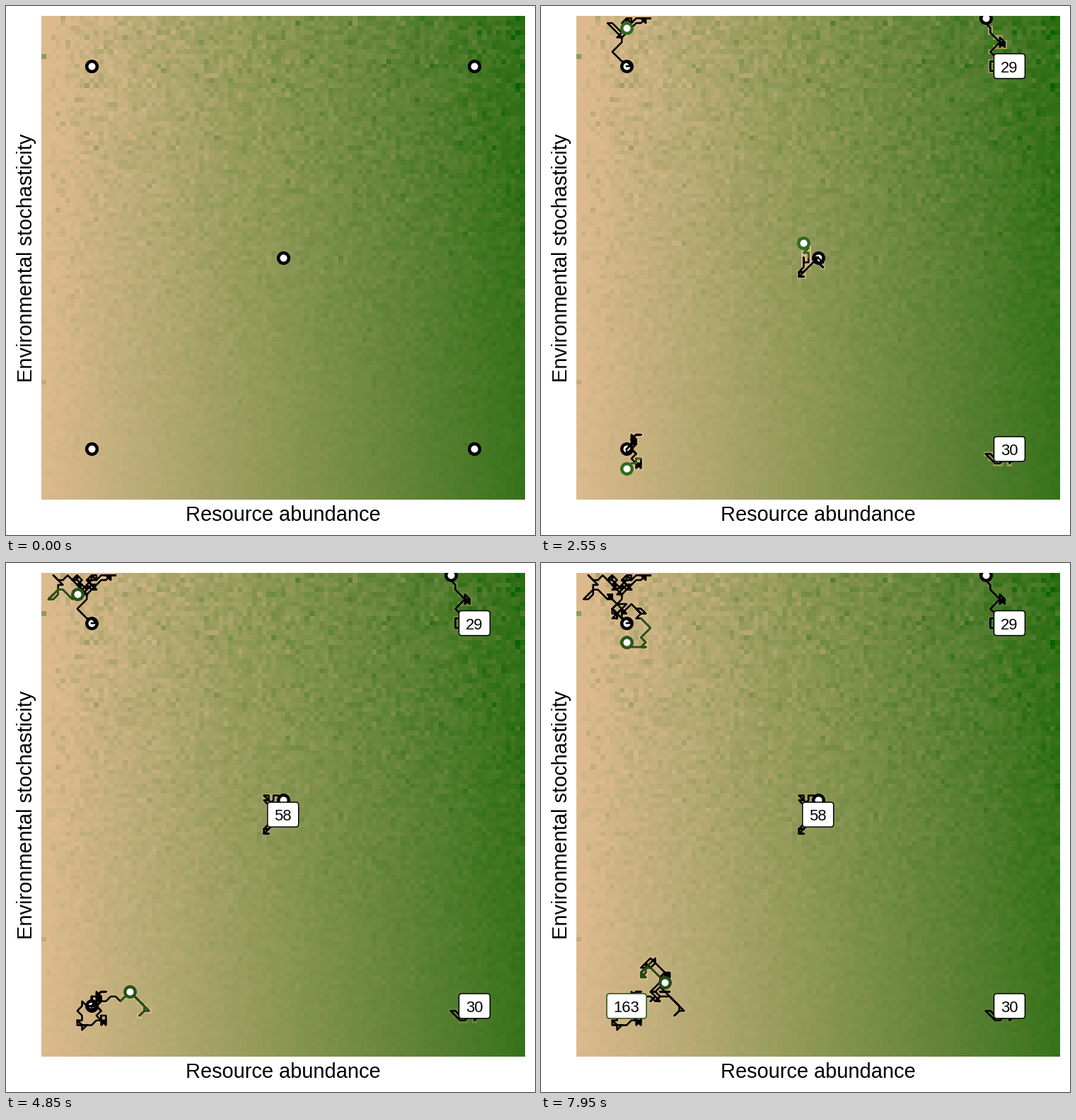
Animation, 748 px wide and 748 px high, one loop 8 s. Source, as a matplotlib script:

```python
import numpy as np
import matplotlib.pyplot as plt
from itertools import product
from matplotlib.animation import FuncAnimation
from matplotlib.colors import ListedColormap
from matplotlib.patches import FancyBboxPatch

SIZE, DPI = 748, 88
PT = 72 / DPI                 # one pixel in points
LEFT, TOP, SIDE = 50, 14, 683.5
N = 101
PX = N / SIDE                 # one pixel in cells
FRAMES, HOLD = 160, 5
FONT = "Liberation Sans"
GREEN = np.array([0.25, 0.54, 0.16])
MOVES = np.array(list(product((-1, 0, 1), repeat=2)))


def lab_ramp(a, b, n=256):
    """Colour ramp between two CIELAB colours, as sRGB rows."""
    t = np.linspace(0, 1, n)[:, None]
    L, A, B = (np.array(a) * (1 - t) + np.array(b) * t).T
    fy = (L + 16) / 116
    f = np.array([fy + A / 500, fy, fy - B / 200])
    xyz = np.where(f > 6 / 29, f ** 3, (f - 4 / 29) * 0.12842)
    xyz *= np.array([[0.9505], [1], [1.089]])
    m = np.array([[3.2406, -1.5372, -0.4986],
                  [-0.9689, 1.8758, 0.0415],
                  [0.0557, -0.2040, 1.0570]])
    lin = np.clip(m @ xyz, 0, 1)
    rgb = np.where(lin > 0.0031308, 1.055 * lin ** (1 / 2.4) - 0.055, 12.92 * lin)
    return rgb.T


def landscape():
    """Resource mean grows to the right, its spread grows upwards."""
    rng = np.random.default_rng(11)
    x = (np.arange(N)[None, :] + 0.5) / N
    y = 1 - np.arange(N)[:, None] / N
    mean = (0.84 + 0.04 * y) * x
    sd = 0.006 + 0.05 * y + 0 * x
    return np.clip(rng.gamma((mean / sd) ** 2, sd ** 2 / mean), 0, 1)


def wander(a, b, steps, rng):
    """Random one-cell moves from a that arrive at b after the given steps."""
    a, b = np.array(a), np.array(b)
    low = np.maximum(np.minimum(a, b) - 1, 0)
    high = np.minimum(np.maximum(a, b) + 1, N - 1)
    for left in reversed(range(steps)):
        near = a + MOVES
        ok = ((near >= low) & (near <= high) & (abs(near - b) <= left)).all(axis=1)
        a = rng.choice(near[ok])
        yield a


class Walker:
    """Random walk through a few (frame, column, row) points."""

    def __init__(self, x, y, *stops, seed, life=None):
        rng = np.random.default_rng(seed)
        path = [(x, y)] * (HOLD + 1)
        for frame, *goal in stops:
            path += list(wander(path[-1], goal, frame - len(path) + 1, rng))
        self.end, self.life = len(path) - 1, life
        path += [path[-1]] * (FRAMES - len(path))
        self.path = np.array(path)

    def dead(self, n):
        return self.life is not None and n >= self.end

    def tint(self, n):
        """Black at first, then a slowly pulsing green; fades after death."""
        m = min(n, self.end)
        pulse = 0.8 - 0.2 * np.cos(2 * np.pi * (m - 38) / 58)
        fade = 1 - (n - self.end) / 8 if self.dead(n) else 1
        return GREEN * pulse * np.clip((m - 24) / 12, 0, 1) * max(0, fade)

    def graze(self, food, n):
        for t, (x, y) in enumerate(self.path[:min(n, self.end) + 1]):
            if t > HOLD:
                food[y, x] = LAND[y, x] * (1 - np.exp(-(n - t) / 45))


WALKERS = [
    Walker(10, 10, (15, 7, 2), (19, 9, 3), (27, 14, 0), (38, 10, 0), (65, 8, 2),
           (80, 2, 0), (97, 7, 4), (108, 7, 9), (120, 9, 6), (135, 13, 7),
           (150, 14, 14), (159, 10, 14), seed=3),
    Walker(10, 90, (19, 12, 88), (38, 12, 93), (52, 9, 94), (65, 8, 89),
           (90, 22, 91), (97, 18, 87), (107, 16, 88), (120, 18, 83),
           (133, 15, 80), (147, 13, 83), (158, 18, 85), seed=5, life=163),
    Walker(50, 50, (19, 50, 51), (27, 47, 53), (38, 47, 50), (52, 47, 46),
           (60, 50, 47), seed=7, life=58),
    Walker(90, 10, (9, 88, 12), (13, 86, 9), (19, 88, 5), (32, 85, 0),
           seed=2, life=29),
    Walker(90, 90, (13, 86, 92), (19, 90, 92), (33, 89, 90), seed=4, life=30),
]
LAND = landscape()

fig = plt.figure(figsize=(SIZE / DPI, SIZE / DPI), dpi=DPI, facecolor="white")
ax = fig.add_axes([LEFT / SIZE, 1 - (TOP + SIDE) / SIZE, SIDE / SIZE, SIDE / SIZE])
cmap = ListedColormap(lab_ramp((77.5, 6, 27), (36.2, -43.37, 41.86)))
image = ax.imshow(LAND, cmap=cmap, vmin=0, vmax=1, interpolation="nearest",
                  aspect="auto")
ax.set(xlim=(-0.5, N - 0.5), ylim=(N - 0.5, -0.5))
ax.axis("off")

mid_x, mid_y = (LEFT + SIDE / 2) / SIZE, 1 - (TOP + SIDE / 2) / SIZE
caption = dict(family=FONT, size=29 * PT, ha="center", va="baseline",
               rotation_mode="anchor")
fig.text(mid_x, 1 - 728 / SIZE, "Resource abundance", **caption)
fig.text(37 / SIZE, mid_y, "Environmental stochasticity", rotation=90, **caption)


def ring(x, y, z):
    return ax.plot([x], [y], "o", ms=14.5 * PT, mfc="white", mec="black",
                   mew=4.4 * PT, zorder=z)[0]


def trail(z):
    return ax.plot([], [], color="black", lw=2.6 * PT, zorder=z,
                   solid_joinstyle="round")[0]


def tag(x, y, value):
    w, h = (19.5 + 12.2 * len(str(value))) * PX, 35 * PX
    box = FancyBboxPatch((x - w / 2, y - h / 2), w, h, fc="white", lw=1.5 * PT,
                         boxstyle=f"round,pad=0,rounding_size={4 * PX}", zorder=6)
    ax.add_patch(box)
    text = ax.text(x, y + 8.5 * PX, str(value), family=FONT, size=22 * PT,
                   ha="center", va="baseline", zorder=7)
    return box, text


for w in WALKERS:
    x, y = w.path[0]
    ring(x, y, 2)
    w.old, w.new, w.head = trail(3), trail(4), ring(x, y, 5)
    w.tag = tag(x, y, w.life) if w.life else ()


def draw(n):
    food = LAND.copy()
    tail = int(np.clip((n - 30) / 5, 0, 14))
    for w in WALKERS:
        w.graze(food, n)
        tint = w.tint(n)
        w.old.set_data(*w.path[:n + 1].T)
        w.new.set_data(*w.path[n - tail:n + 1].T)
        w.new.set_color(tint)
        w.head.set_data(*w.path[n:n + 1].T)
        w.head.set_markeredgecolor(tint)
        for part in w.tag:
            part.set_visible(w.dead(n))
        if w.tag:
            w.tag[0].set_edgecolor(tint)
    image.set_data(food)
    return []


anim = FuncAnimation(fig, draw, frames=FRAMES, interval=50, repeat=True,
                     repeat_delay=0, blit=False)
plt.show()
```
